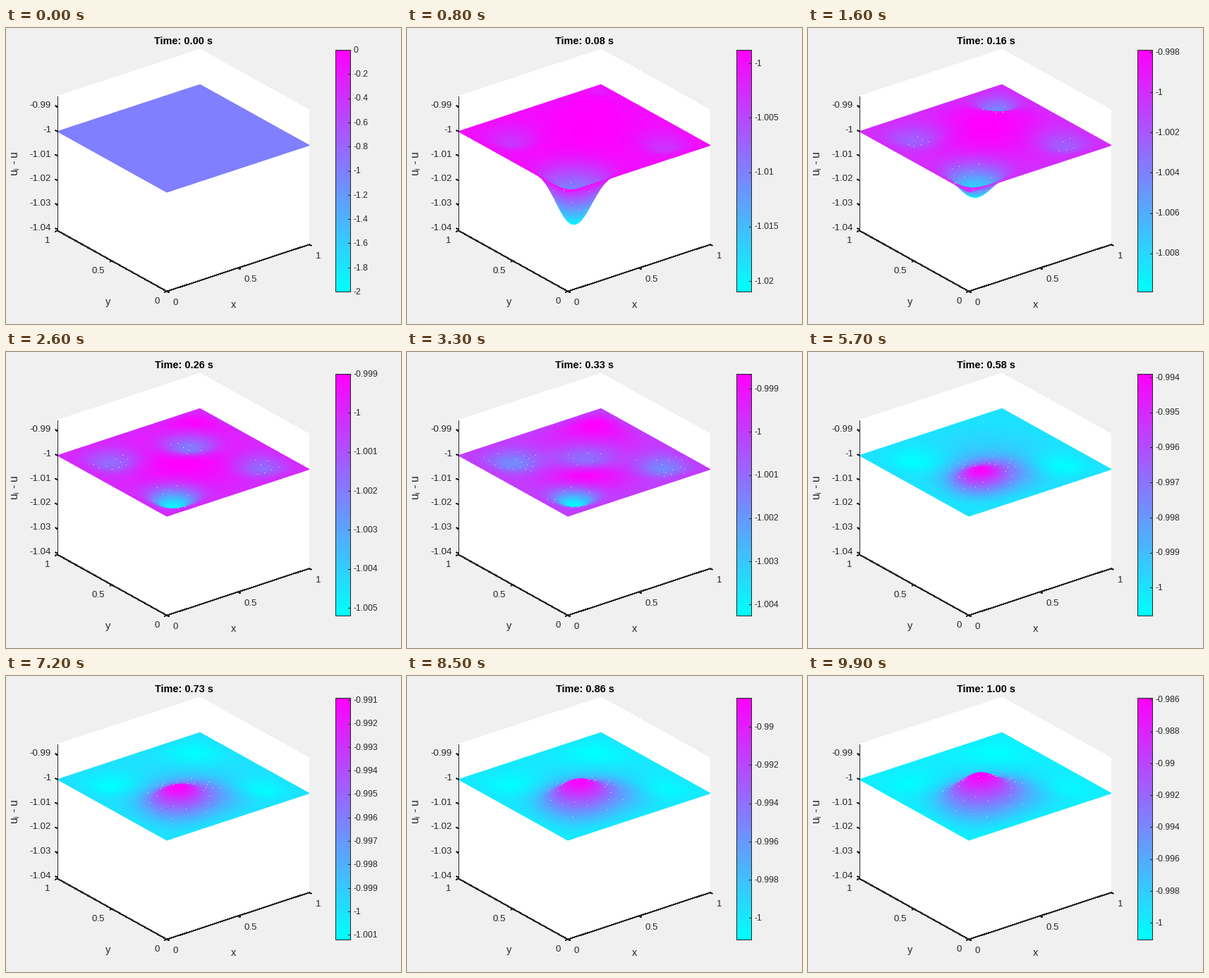
Write a matplotlib script that moves like this. It is 560 px wide and 420 px high and loops after 10 s.

```python
import numpy as np
import matplotlib.pyplot as plt
from matplotlib.animation import FuncAnimation

W, H, DPI, FRAMES = 560, 420, 100, 100
INK = "#262626"
PX = 72 / DPI
Z_SCALE = 3475
plt.rcParams["font.family"] = "Liberation Sans"

# From the far corner to the near one, so nearer cells paint over farther ones.
side = np.linspace(1, 0, 61)
X, Y = np.meshgrid(side, side)
FADE = np.prod([np.tanh(9 * s) * np.tanh(9 * (1 - s)) for s in (X, Y)], axis=0)

# Range of the surface around -1 at a few moments
T_KEY = np.array([1, 16, 26, 41, 57, 72, 99]) / 99
DEPTH = [0.0405, 0.0099, 0.0052, 0.0034, 0.0008, 0.0012, 0.00105]
HEIGHT = [0.0005, 0.0021, 0.0010, 0.00175, 0.0061, 0.0091, 0.0141]


def project(x, y, z=-1.0):
    return (228 + 202 * x - 155 * y,
            233 - 66.5 * x - 86.2 * y - (z + 1) * Z_SCALE)


def smooth(t, a, b):
    s = np.clip((t - a) / (b - a), 0, 1)
    return s * s * (3 - 2 * s)


def bump(x, y, s, h):
    return h * np.exp(-((X - x) ** 2 + (Y - y) ** 2) / (2 * s * s))


def surface(t):
    if t == 0:
        return np.full_like(X, -1.0)
    # A dip near the front corner that dies away
    c = 0.16 + 0.1 * min(t, 0.41)
    dip = 0.00155 * t / (t * t + 0.019 ** 2) * (1 - smooth(t, 0.38, 0.56))
    f = bump(c, c, 0.12 - 0.1 * min(t, 0.4), -dip)
    # A second dip running inwards from the far corner
    d = 1.15 - 1.8 * t
    f += bump(d, d, 0.05 + 0.26 * t, -0.02 * np.exp(-7 * t))
    # Side troughs and the broad crest between them
    trough = 0.001 + 0.003 * np.exp(-4 * t)
    f += bump(0.2, 0.77, 0.12, -trough) + bump(0.84, 0.2, 0.12, -trough)
    f += bump(0.55, 0.55, 0.26, 0.0025 * np.exp(-2.9 * t))
    f += bump(0.86, 0.86, 0.15, 0.0012 * (1 - 2 * smooth(t, 0.42, 0.72)))
    # The hump that rises to the end
    rise = 0.019 * max(t - 0.26, 0)
    f += bump(0.27, 0.27, 0.07 + 0.05 * t, 0.65 * rise)
    f += bump(0.41, 0.32, 0.1 + 0.1 * t, 0.45 * rise)

    f *= FADE
    high = np.interp(t, T_KEY, HEIGHT)
    low = np.exp(np.interp(t, T_KEY, np.log(DEPTH)))
    return -1 + np.where(f > 0, f * high / f.max(), f * low / -f.min())


def nice_step(span):
    for e in range(-6, 2):
        for m in (1, 2, 5):
            if span / (m * 10.0 ** e) <= 11:
                return m * 10.0 ** e


fig = plt.figure(figsize=(W / DPI, H / DPI), dpi=DPI, facecolor="#f0f0f0")
ax = fig.add_axes([0, 0, 1, 1])
ax.axis("off")


def line(*pts):
    return ax.plot(*zip(*pts), color=INK, lw=PX, zorder=4, antialiased=False,
                   solid_capstyle="butt")[0]


def label(x, y, text, size=13.3, ha="center", **kw):
    kw.setdefault("color", INK)
    return ax.text(x, y, text, fontsize=size * PX, ha=ha,
                   va="center", zorder=5, **kw)


# Box
LO, HI = -1.0405, -0.9856
hexagon = [project(0, 1, HI), project(1, 1, HI), project(1, 0, HI),
           project(1, 0, LO), project(0, 0, LO), project(0, 1, LO)]
ax.fill(*zip(*hexagon), color="white", lw=0, zorder=1, antialiased=False)
line(hexagon[0], hexagon[5])
line(hexagon[5], hexagon[4])
line(hexagon[4], hexagon[3])


def tick(p, dx, dy):
    line(p, (p[0] + dx, p[1] + dy))


for v in (0, 0.5, 1):
    px, py = project(v, 0, LO)
    tick((px, py), 3, 1.7)
    label(px + 12.5 + 5 * (v == 0.5), py + 16.5, f"{v:g}")
    px, py = project(0, v, LO)
    tick((px, py), -3.3, 1.1)
    label(px - 14 - 6 * (v == 0.5), py + 14.5, f"{v:g}")
for v in np.arange(-0.99, -1.045, -0.01):
    px, py = project(0, 1, v)
    tick((px, py), -3, -1.7)
    label(64, py - 2, f"{v:.4g}", ha="right")
label(323, 393, "x", 14.6)
label(145, 389, "y", 14.6)
label(14, 192, r"u$_\mathregular{i}$ - u", 15.8, rotation=90)
title = label(252, 18.8, "", 14.5, weight="bold", color="black")

# Colour bar
BX0, BX1, BY0, BY1 = 467, 488, 31, 374
ax.imshow(np.linspace(1, 0, 256)[:, None], cmap="cool", aspect="auto",
          extent=(BX0, BX1, BY1, BY0), zorder=2)
line((BX0, BY0), (BX1, BY0), (BX1, BY1), (BX0, BY1), (BX0, BY0))

ax.set_xlim(0, W)
ax.set_ylim(H, 0)

# Fine light specks on some mesh nodes
nodes = np.zeros(X.shape, bool)
nodes[3:-3:3, 3:-3:3] = np.random.default_rng(4).random((19, 19)) < 0.5
specks, = ax.plot([], [], ls="", marker=",", color="#f0e4d8", zorder=3)

changing = []


def draw(k):
    while changing:
        changing.pop().remove()
    t = k / (FRAMES - 1)
    z = surface(t)
    lo, hi = (-2, 0) if k == 0 else (z.min(), z.max())
    sx, sy = project(X, Y, z)
    changing.append(ax.pcolormesh(sx, sy, z, shading="gouraud", cmap="cool",
                                  vmin=lo, vmax=hi, zorder=2))

    tone = (z - lo) / (hi - lo)
    steep = np.hypot(*np.gradient(tone)) > 0.012
    on = nodes & steep & (tone > 0.28) & (tone < 0.7)
    specks.set_data(sx[on], sy[on])

    step = nice_step(hi - lo)
    first, last = np.ceil(lo / step - 1e-6), np.floor(hi / step + 1e-6)
    for n in np.arange(first, last + 1):
        v = n * step
        y = BY1 - (v - lo) / (hi - lo) * (BY1 - BY0)
        changing.append(line((BX1 - 3, y), (BX1, y)))
        changing.append(label(492.5, y + 0.8, f"{round(v, 6) + 0.0:g}",
                              12.3, "left"))
    title.set_text(f"Time: {t:.2f} s")
    return []


anim = FuncAnimation(fig, draw, frames=FRAMES, interval=100,
                     init_func=lambda: [], repeat=True, repeat_delay=0)
plt.show()
```
